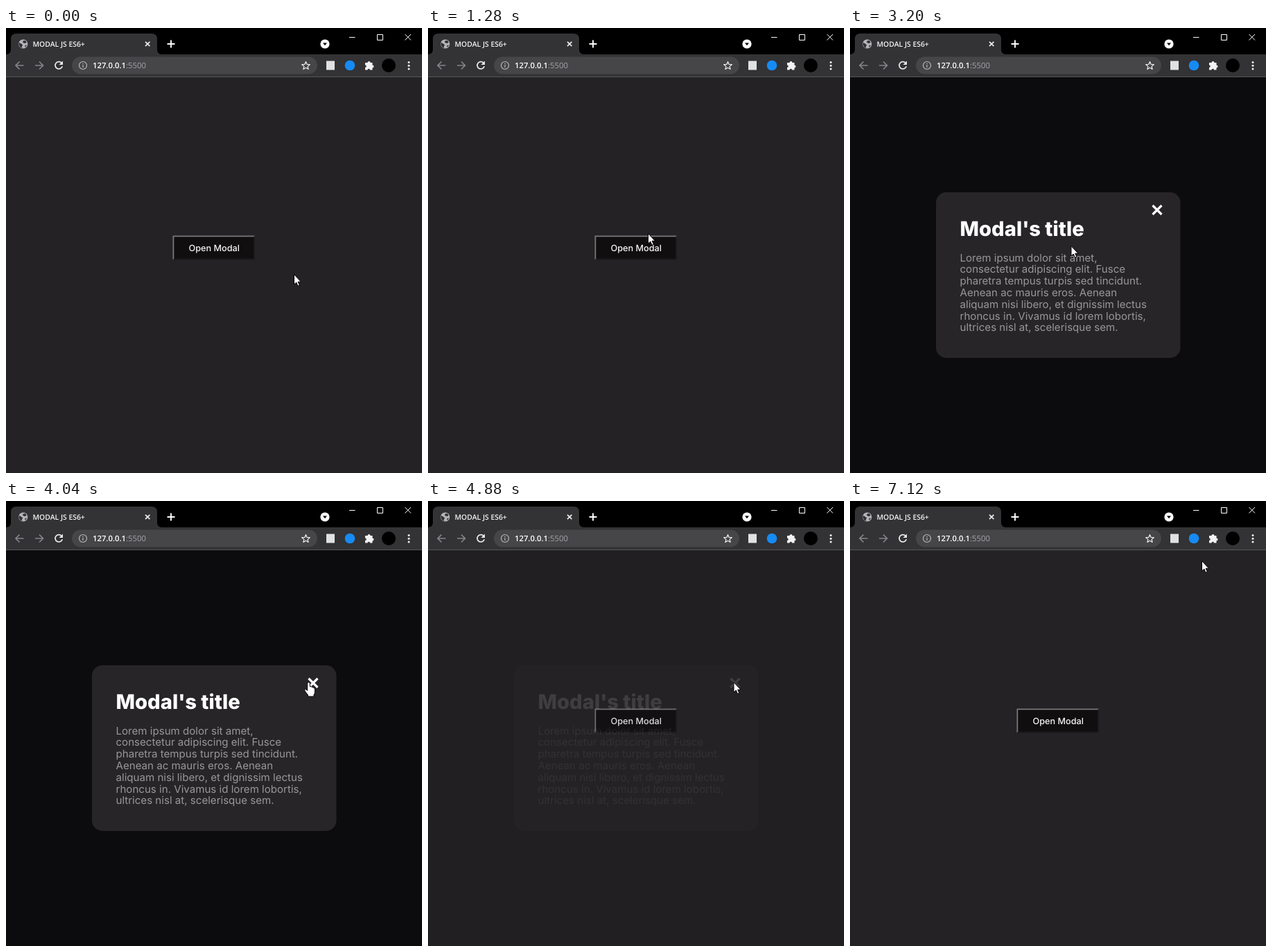
Animation of 600 by 642 pixels, one loop 7200 ms. Source, as an HTML page:

```html
<!DOCTYPE html>
<html lang="en">
<head>
<meta charset="utf-8">
<title>Modal demo</title>
<style>
  html, body { margin: 0; width: 100%; height: 100%; overflow: hidden; background: #242225; }
  svg { display: block; width: 600px; height: 642px; }
  text { font-family: Inter, sans-serif; white-space: pre; text-rendering: geometricPrecision; }
  .ui { font-family: "Open Sans", sans-serif; }
  .line { fill: none; stroke: #eceded; stroke-width: 1.7; }
  .dim { stroke: #858488; }
  .soft { stroke: #b9babd; stroke-width: 1.2; }
  .thin { stroke-width: 1; stroke: #fff; }
  .bold { stroke-width: 1.9; stroke: #fff; }
  .close { stroke-width: 3.2; stroke: #fff; }
  .cursor { fill: #fff; stroke: #000; stroke-width: 1; stroke-linejoin: round; }
</style>
</head>
<body>
<svg viewBox="0 0 600 642">
  <rect width="600" height="642" fill="#242225"/>

  <g id="button">
    <rect x="240.5" y="299.5" width="118.5" height="35" fill="#1b191b"/>
    <path d="M240.5 334.5V299.5H359L357 301.5H242.5V332.5Z" fill="#7b797b"/>
    <rect x="242.5" y="301.5" width="114.5" height="31" fill="#100e0f"/>
    <text x="263.5" y="321.5" font-size="12.7" font-weight="500" fill="#f6f6f6">Open Modal</text>
  </g>

  <g id="overlay" opacity="0">
    <rect y="71" width="600" height="571" fill="#000203" opacity=".67"/>
    <rect x="124" y="237" width="352.5" height="239" rx="15" fill="#272528"/>
    <text x="158.5" y="299.5" font-size="29.2" font-weight="800" fill="#fff">Modal's title</text>
    <g id="paragraph" font-size="15.1" fill="#989799"></g>
    <path class="line close" d="M436.5 256l13 13M449.5 256l-13 13"/>
  </g>

  <g id="browser">
    <rect width="600" height="39"/>
    <path d="M0 38Q7 38 7 31V16Q7 8 15 8H210Q218 8 218 16V31Q218 38 225 38H600V71H0Z" fill="#333235"/>
    <rect y="70" width="600" height="1" fill="#565558"/>

    <circle cx="24.8" cy="23" r="6.6" fill="#b4b5b8"/>
    <path d="M19 21l3.5 2 1.8 1.4-1.4 2.2.4 2.2-2.6-.8-2.2-4ZM24.5 18.500l3.5-.4 1.8 2.6-2.6 1.6-3-1.4ZM27.500 25l2.6-.4-1.6 2.6-1.2.4Z" fill="#333235"/>
    <text class="ui" x="38.5" y="27" font-size="10.4" font-weight="600" fill="#f4f4f5">MODAL JS ES6+</text>
    <path class="line" d="M201 19.8l6.4 6.4M207.4 19.8l-6.4 6.4"/>
    <path class="line bold" d="M232.5 23h11M238 17.5v11"/>

    <circle cx="460" cy="23" r="6.6" fill="#fff"/>
    <path d="M457 21.5h6l-3 3.8Z"/>
    <path class="line thin" d="M495 13.5h8.5M535.5 9.5h8v8h-8ZM575.5 9l8.5 8.5M584 9l-8.5 8.5"/>

    <path class="line dim" d="M25.5 54h-11M19.5 48.5L14 54l5.5 5.5M42 54h11M48 48.5l5.5 5.5-5.5 5.5"/>
    <path class="line" d="M80 50.2A5.2 5.2 0 1 0 81.2 55.2"/>
    <path d="M82 47.5v5.5h-5.5Z" fill="#eceded"/>

    <rect x="95" y="41.5" width="354" height="25" rx="12.5" fill="#464548"/>
    <circle class="line soft" cx="111" cy="54" r="5.5"/>
    <path class="line soft" d="M111 53.3v3.7M111 50.8v1.4"/>
    <text class="ui" x="125" y="58" font-size="11.3" font-weight="500" fill="#a5a6aa"><tspan fill="#fff" font-weight="600">127.0.0.1</tspan>:5500</text>
    <path class="line" d="M432.5 48.5l1.6 3.9 4.2.3-3.2 2.7 1 4.1-3.6-2.2-3.6 2.2 1-4.1-3.2-2.7 4.2-.3Z" stroke-linejoin="round" style="stroke-width:1.2"/>

    <rect x="462" y="47.5" width="12" height="13" fill="#dfe1e3"/>
    <circle cx="496" cy="54" r="7.3" fill="#168bf4"/>
    <path d="M518 50h3.5a2 2 0 1 1 4 0H528.5v3.5a2 2 0 1 1 0 4V60.5H525a1.7 1.7 0 1 0-3.5 0H518V57a1.7 1.7 0 1 0 0-3.5Z" fill="#f1f2f3"/>
    <circle cx="552" cy="54" r="10"/>
    <g fill="#f1f2f3">
      <circle cx="581" cy="49.5" r="1.5"/><circle cx="581" cy="54.2" r="1.5"/><circle cx="581" cy="58.9" r="1.5"/>
    </g>
  </g>

  <g id="pointer">
    <path id="arrow" class="cursor" d="M.5.5V15L3.8 12 6 17.2 8.400 16.2 6.2 11.2H10.5Z"/>
    <path id="hand" class="cursor" d="M-1.8 1.5Q-1.8 0 0 0T1.9 1.5V6.3Q4.2 5.6 4.8 7.2 7 6.7 7.4 8.3 9 8.2 9 10V14Q9 16.5 7.5 18V20.5H-1V18.5L-5.3 12.8Q-6.4 11-5 10.2-3.8 9.7-1.8 12Z"/>
  </g>
</svg>

<script>
const LOOP = 7200, STEP = 40;
const $ = id => document.getElementById(id);

const lines = [
  "Lorem ipsum dolor sit amet,",
  "consectetur adipiscing elit. Fusce",
  "pharetra tempus turpis sed tincidunt.",
  "Aenean ac mauris eros. Aenean",
  "aliquam nisi libero, et dignissim lectus",
  "rhoncus in. Vivamus id lorem lobortis,",
  "ultrices nisl at, scelerisque sem."
];
$("paragraph").innerHTML = lines
  .map((line, i) => `<text x="158.5" y="${336.5 + i * 16.8}">${line}</text>`).join("");

// Each move: start time, end time, destination.
const home = [415, 355];
const moves = [
  [0, 320, 394, 341],
  [520, 1280, 317, 296],
  [1280, 1640, 324, 312],
  [2960, 3200, 318.5, 314],
  [3440, 4000, 436.5, 261.5],
  [4040, 4200, 440.5, 261],
  [6320, 7120, 507, 86]
];
const handTimes = [[1360, 2980], [3880, 4560]];

const clamp = x => Math.min(1, Math.max(0, x));
const progress = (t, start, end) => clamp((t - start) / (end - start));
const smooth = x => x * x * (3 - 2 * x);

function pointerAt(t) {
  let [x, y] = home;
  for (const [start, end, toX, toY] of moves) {
    const p = smooth(progress(t, start, end));
    x += (toX - x) * p;
    y += (toY - y) * p;
  }
  return [x, y];
}

function draw(now) {
  const t = Math.floor(now % LOOP / STEP) * STEP;
  const isHand = handTimes.some(([from, to]) => t >= from && t < to);
  $("overlay").setAttribute("opacity", progress(t, 2250, 3000) - progress(t, 4220, 4970));
  $("pointer").setAttribute("transform", `translate(${pointerAt(t)})`);
  $("hand").style.display = isHand ? "" : "none";
  $("arrow").style.display = isHand ? "none" : "";
}

let startTime;
function frame(now) {
  startTime ??= now;
  draw(now - startTime);
  requestAnimationFrame(frame);
}
draw(0);
requestAnimationFrame(frame);
</script>
</body>
</html>
```
